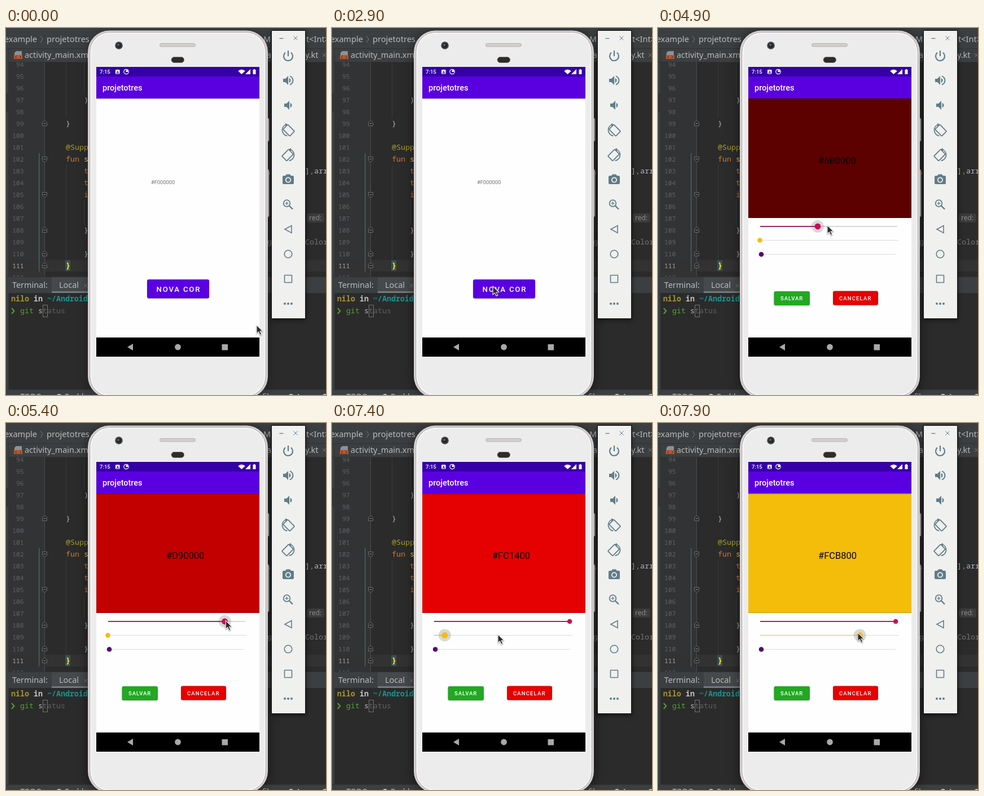
Write an HTML page with a canvas that moves like this. It is 567 by 651 pixels and loops after 8 s.

```html
<!DOCTYPE html>
<html lang="pt">
<head>
<meta charset="utf-8">
<title>projetotres</title>
<style>
html, body { margin: 0; width: 100%; height: 100%; overflow: hidden; background: #2b2b2b; }
canvas { display: block; }
</style>
</head>
<body>
<canvas id="stage" width="567" height="651"></canvas>
<script>
const c = document.getElementById('stage').getContext('2d');
const LOOP = 8000, TICK = 100;
const UI = '"Noto Sans", "Open Sans", sans-serif';
const MONO = '"Noto Sans Mono", "DejaVu Sans Mono", monospace';
const ROBOTO = 'Roboto, sans-serif';
const BAR = '#3c3f41', EDITOR = '#2b2b2b', PURPLE = '#5a00e0', ICON = '#5f7d88';

// Keyframes: time followed by values, linear in between.
const POINTER = [
  [100, 444, 527], [400, 403, 509], [600, 403, 509], [1000, 279, 457],
  [1200, 279, 457], [1700, 285, 458], [3100, 285, 458], [3400, 319, 469],
  [3600, 322, 470], [3700, 322, 470], [3800, 249, 439], [3900, 249, 439],
  [4000, 184, 360], [4100, 184, 360], [4200, 177, 339], [4400, 177, 339],
  [4500, 183, 352], [4700, 183, 352], [4900, 300, 350], [5000, 345, 357],
  [5200, 378, 352], [5300, 378, 352], [5700, 423, 346], [6200, 423, 346],
  [6300, 418, 352], [6500, 205, 372], [6600, 205, 372], [6800, 176, 372],
  [7100, 176, 372], [7200, 225, 381], [7300, 225, 381], [7400, 294, 375],
  [7600, 332, 375], [7700, 332, 375], [7900, 354, 372]
];
const RED = [[4700, 0], [4900, 107], [5200, 204], [5300, 204], [5700, 255], [6200, 255], [6300, 252]];
const GREEN = [[7300, 0], [7400, 20], [7600, 150], [7700, 150], [7900, 184]];

function at(keys, t) {
  if (t <= keys[0][0]) return keys[0].slice(1);
  for (let i = 1; i < keys.length; i++) {
    const a = keys[i - 1], b = keys[i];
    if (t <= b[0]) {
      const p = (t - a[0]) / (b[0] - a[0]);
      return a.slice(1).map((v, j) => v + (b[j + 1] - v) * p);
    }
  }
  return keys[keys.length - 1].slice(1);
}
const clamp = v => Math.max(0, Math.min(1, v));

function rect(x, y, w, h, fill) {
  c.fillStyle = fill;
  c.fillRect(x, y, w, h);
}
function round(x, y, w, h, r, fill, stroke, lw = 1) {
  c.beginPath();
  c.roundRect(x, y, w, h, r);
  if (fill) { c.fillStyle = fill; c.fill(); }
  if (stroke) { c.strokeStyle = stroke; c.lineWidth = lw; c.stroke(); }
}
function disc(x, y, r, fill) {
  c.beginPath();
  c.arc(x, y, r, 0, 7);
  c.fillStyle = fill;
  c.fill();
}
function arc(x, y, r, a, b, stroke, lw) {
  c.beginPath();
  c.arc(x, y, r, a, b);
  c.strokeStyle = stroke;
  c.lineWidth = lw;
  c.stroke();
}
function path(pts, fill, stroke, lw = 1, close = true) {
  c.beginPath();
  for (let i = 0; i < pts.length; i += 2) c.lineTo(pts[i], pts[i + 1]);
  if (close) c.closePath();
  if (fill) { c.fillStyle = fill; c.fill(); }
  if (stroke) { c.strokeStyle = stroke; c.lineWidth = lw; c.stroke(); }
}
const line = (x1, y1, x2, y2, color, lw = 1) => path([x1, y1, x2, y2], null, color, lw, false);
function text(s, x, y, font, color, gap = 0, align = 'left') {
  c.font = font;
  c.fillStyle = color;
  c.letterSpacing = gap + 'px';
  c.textAlign = align;
  c.fillText(s, x, y);
}
function shadow(color, blur, dy) {
  c.shadowColor = color;
  c.shadowBlur = blur;
  c.shadowOffsetY = dy;
}
const noShadow = () => shadow('transparent', 0, 0);
function cross(x, y, r, color) {
  line(x - r, y - r, x + r, y + r, color);
  line(x - r, y + r, x + r, y - r, color);
}

const rowY = n => 64.5 + (n - 94) * 21;
function code(n, x, s, color, bold) {
  text(s, x, rowY(n) + 4.5, (bold ? 'bold ' : '') + '13.3px ' + MONO, color);
}

function editor() {
  rect(0, 0, 567, 651, EDITOR);
  rect(5, 61, 63, 380, '#313335');
  rect(5, 411, 562, 21, '#323232');
  line(106.5, 61, 106.5, 160, '#393b3c');
  line(138.5, 61, 138.5, 118, '#393b3c');
  line(106.5, 243, 106.5, 411, '#393b3c');
  line(138.5, 306, 138.5, 349, '#393b3c');
  line(68.5, 61, 68.5, 441, '#4a4c4d');
  rect(58, 222, 1.3, 210, '#4d6b66');
  for (let n = 94; n <= 112; n++)
    text(n, 31.5, rowY(n) + 4, '11.3px ' + MONO, n == 111 ? '#a4a3a3' : '#606366', 0, 'right');
  for (const n of [99, 102, 105, 108, 110, 111]) {
    const y = rowY(n), d = n == 102 || n == 105 ? 1 : -1;
    path([64.5, y - 4 * d, 72.5, y - 4 * d, 72.5, y + 2 * d, 68.5, y + 5.5 * d, 64.5, y + 2 * d], EDITOR, '#6a6c6d');
    line(66.5, y, 70.5, y, '#8a8c8d');
  }
  rect(105, 412, 9, 19, '#3b514d');
  code(97, 138, ')', '#a9b7c6');
  code(99, 106, '}', '#a9b7c6');
  code(101, 106, '@Suppress', '#a9a028');
  code(102, 106, 'fun', '#cc7832');
  code(102, 138, 's', '#ffc66d');
  code(103, 138, 't', '#cc7832');
  code(104, 138, 't', '#cc7832');
  code(105, 138, 'if', '#cc7832');
  code(108, 138, '}', '#a9b7c6');
  code(110, 138, '}', '#a9b7c6');
  code(111, 106, '}', '#ffef28', true);
  code(103, 463, ',', '#cc7832');
  code(103, 530, ']', '#a9b7c6');
  code(103, 538, ',', '#cc7832');
  code(103, 546, 'arr', '#a9b7c6');
  round(533, 329, 31, 16, 4, '#3b3b3b');
  text('red:', 537, 341, '12px ' + UI, '#8a8a8a');
  code(109, 463, 'gr', '#777');
  code(109, 530, 'Color', '#777');

  // Breadcrumbs and tabs
  rect(0, 0, 567, 61, BAR);
  rect(0, 36, 567, 1, '#2f3133');
  rect(0, 60, 567, 1, '#323232');
  rect(0, 61, 5, 590, BAR);
  rect(4, 37, 1, 604, '#323435');
  rect(0, 115, 4, 34, '#313335');
  text('example', 55, 25, '14.5px ' + UI, '#bbb', 0, 'right');
  text('projetotres', 72, 25, '14.6px ' + UI, '#bbb');
  path([61, 14, 65, 20, 61, 26], null, '#777', 1, false);
  text('M', 456, 25, '14.5px ' + UI, '#bbb');
  text('t<Int>', 532, 25, '14.5px ' + UI, '#bbb');
  path([18, 41, 28, 41, 28, 55, 15, 55, 15, 44], '#8a9298');
  rect(14, 48, 15, 7, '#b8582f');
  path([19, 49, 16.5, 51.5, 19, 54], null, '#3a2a22', 1, false);
  path([24, 49, 26.5, 51.5, 24, 54], null, '#3a2a22', 1, false);
  text('activity_main.xml', 33, 53, '14.4px ' + UI, '#bbb');
  text('a', 462, 53, '14.4px ' + UI, '#bbb');
  text('y.kt', 530, 53, '14.4px ' + UI, '#bbb');
  cross(564, 48, 3, '#777');

  // Terminal
  rect(0, 441, 567, 29, BAR);
  rect(0, 441, 567, 1, '#323232');
  text('Terminal:', 11, 461, '14.4px ' + UI, '#bbb');
  rect(81, 442, 70, 28, '#45494b');
  text('Local', 94, 461, '14.4px ' + UI, '#bbb');
  cross(141, 457, 3, '#777');
  rect(81, 467, 70, 3, '#747a80');
  const term = '13.3px ' + MONO;
  text('nilo', 9, 485, 'bold ' + term, '#a3942f');
  text('in', 49, 485, 'bold ' + term, '#c4c4c4');
  text('~/Android', 73, 485, 'bold ' + term, '#1a9490');
  path([10, 497, 14.5, 502, 10, 507], null, '#4fa52c', 2, false);
  text('git', 25, 506, term, '#4fa52c');
  text('s', 57, 506, term, '#bbb');
  text('tatus', 65, 506, term, '#606060');
  round(65.5, 491.5, 8, 21, 0, null, '#777');
  rect(0, 641, 567, 10, BAR);
  rect(0, 641, 567, 1, '#323232');
  text('≡ TODO', 14, 659, '13.5px ' + UI, '#bbb');
  disc(94, 654, 5, '#bbb');
  text('Problems', 104, 659, '13.5px ' + UI, '#bbb');
  text('filer', 454, 659, '13.5px ' + UI, '#bbb');
  disc(505, 654, 5, '#bbb');
  text('App', 514, 659, '13.5px ' + UI, '#bbb');
  disc(565, 654, 5, '#bbb');
}

function phone(focus) {
  round(461, 160, 5, 41, 2, '#d8d6d6', '#8d8a8a');
  round(461, 251, 5, 84, 2, '#d8d6d6', '#8d8a8a');
  shadow(`rgba(0,0,0,${0.3 + 0.2 * focus})`, 20, 2);
  round(145, 4.5, 319, 651.5, 38, '#d6d1d0');
  noShadow();
  round(148.8, 7.5, 311.4, 645.5, 35, '#ebeceb', '#a7a1a0');
  round(150.5, 9, 308, 642.5, 33.5, null, '#f6f6f6', 2);
  disc(200, 31, 6.8, '#454648');
  disc(200, 31, 4.6, '#242628');
  disc(199, 30, 1.8, '#67717a');
  round(272.5, 27.5, 63, 5.5, 2.7, '#d3cfcf', '#b7b1b1');
  round(293, 51.5, 22.5, 10, 5, '#2e2b2b', '#77716f', 0.8);
}

function appBar() {
  rect(160, 69, 289, 480, '#fdfefd');
  shadow('rgba(0,0,0,.3)', 2, 0.5);
  rect(160, 86, 289, 39, PURPLE);
  noShadow();
  rect(160, 69, 289, 17, '#3500a6');
  text('projetotres', 171, 111, '500 14.5px ' + ROBOTO, '#fff');
}

function statusIcons() {
  text('7:15', 166, 81, '500 9.5px ' + ROBOTO, '#fff');
  round(194, 74, 7.5, 7.5, 1, '#fff');
  text('A', 197.8, 80.5, 'bold 7px ' + ROBOTO, '#3500a6', 0, 'center');
  arc(213, 77.5, 4.2, 0, 7, '#fff', 1.2);
  rect(212.5, 74.5, 3.5, 3.5, '#fff');
  c.beginPath();
  c.moveTo(417.5, 82);
  c.arc(417.5, 82, 8.2, -Math.PI * 0.77, -Math.PI * 0.23);
  c.fillStyle = '#fff';
  c.fill();
  path([424, 82, 433, 82, 433, 73], '#fff');
  rect(437.5, 74, 5, 8, '#fff');
  rect(439, 73, 2, 1, '#fff');
}

function button(x, y, w, h, fill, lift = 0) {
  shadow('rgba(0,0,0,.3)', 1.5 + lift, 0.6 + lift);
  round(x, y, w, h, 3, fill);
  noShadow();
}

function homeScreen(pressed) {
  appBar();
  text('#F000000', 257, 277, '9.3px ' + ROBOTO, '#747474');
  button(250, 446, 110, 33.5, PURPLE, pressed ? 0.6 : 0);
  text('NOVA COR', 266.5, 468, '500 13.2px ' + ROBOTO, '#fff', 1.8);
}

function slider(x, end, y, lw, value, tint, thumb, pressed, halo) {
  const px = x + (end - x) * value / 255;
  line(x, y, end, y, '#dadada', lw);
  line(x, y, px, y, tint, lw);
  if (halo) disc(px, y, 11, 'rgba(70,70,70,.2)');
  disc(px, y, pressed ? 5.4 : 4.3, thumb);
}

const hex = v => Math.round(v).toString(16).toUpperCase().padStart(2, '0');

function pickerScreen(t) {
  const [r] = at(RED, t), [g] = at(GREEN, t);
  appBar();
  if (t >= 4800) {
    const shown = [230 * (r / 255) ** 1.05 + 16 * g / 184, 189 * clamp((g - 20) / 164), 10 * g / 184];
    rect(160, 125, 289, 212, `rgb(${shown.map(Math.round).join()})`);
    rect(160, 125, 289, 1.5, 'rgba(0,0,0,.22)');
    rect(160, 336, 289, 1, 'rgba(0,0,0,.2)');
    text('#' + hex(r) + hex(g) + '00', 284, 241, '16.5px ' + ROBOTO, '#0a0000');
  }
  const dragRed = t >= 4800 && t < 6400;
  slider(181, 424, 352, 2, r, '#a0246c', '#cc0c5c', dragRed, dragRed);
  slider(180.5, 426, 376.5, 1.2, g, '#dcc440', '#f3bd10', t >= 7200, t >= 7300);
  slider(183, 421, 401.5, 1.2, 0, '#5a0072', '#5a0072');
  button(205.5, 467, 63.5, 25, '#22a822');
  text('SALVAR', 217, 483, '500 9.5px ' + ROBOTO, '#fff', 1);
  button(310, 466.5, 80, 25, '#e60000');
  text('CANCELAR', 321, 482.5, '500 9.5px ' + ROBOTO, '#fff', 1.15);
}

// Draws a view scaled about the middle of the display.
function zoomed(scale, alpha, view) {
  c.save();
  c.globalAlpha = alpha;
  c.translate(304.5, 326);
  c.scale(scale, scale);
  c.translate(-304.5, -326);
  view();
  c.restore();
}

function screen(t) {
  c.save();
  c.beginPath();
  c.rect(160, 69, 289, 514);
  c.clip();
  const shown = 1 - (1 - clamp((t - 3100) / 500)) ** 4;
  if (shown < 1) zoomed(1 + 0.05 * shown, 1, () => homeScreen(t >= 2900));
  if (shown > 0) zoomed(0.85 + 0.15 * shown, clamp(shown * 1.5), () => pickerScreen(t));
  statusIcons();
  rect(160, 549, 289, 34, '#000');
  path([215, 566, 225, 560, 225, 572], '#a9a9a9');
  disc(304.5, 566, 5.4, '#a9a9a9');
  rect(382.5, 561, 10.5, 10.5, '#a9a9a9');
  c.restore();
}

function speaker(x, y, waves) {
  path([x, y - 3, x + 4, y - 3, x + 9, y - 8, x + 9, y + 8, x + 4, y + 3, x, y + 3], ICON);
  c.beginPath();
  c.arc(x + 9, y, 4.5, -1.2, 1.2);
  c.fillStyle = ICON;
  c.fill();
  if (waves) arc(x + 9.5, y, 8, -1.25, 1.25, ICON, 2);
}
function rotateIcon(y, dir) {
  c.save();
  c.translate(500, y);
  c.scale(dir, 1);
  c.save();
  c.translate(1, 0.5);
  c.rotate(Math.PI / 4);
  round(-8.5, -6, 17, 12, 1, null, ICON, 1.8);
  c.restore();
  arc(0, 0, 10.5, Math.PI * 0.55, Math.PI * 1.35, ICON, 1.6);
  path([-5, -12, 0, -9.5, -5, -6.5], ICON);
  c.restore();
}

function toolbar() {
  shadow('rgba(0,0,0,.6)', 8, 2);
  rect(470, 4, 61, 512, '#111');
  noShadow();
  rect(471, 5, 59, 510, '#f0f0ef');
  line(484.5, 18.5, 491.5, 18.5, ICON, 1.3);
  cross(513, 18, 3.5, ICON);
  arc(500, 50, 8, -0.9, Math.PI + 0.9, ICON, 2.2);
  line(500, 40, 500, 50, ICON, 2.2);
  speaker(491, 93, true);
  speaker(493, 137, false);
  rotateIcon(181, 1);
  rotateIcon(225, -1);
  round(490, 262, 20, 15, 2, ICON);
  path([495, 262, 497, 259.5, 503, 259.5, 505, 262], ICON);
  disc(500, 269.5, 5, '#f0f0ef');
  disc(500, 269.5, 3.2, ICON);
  arc(497.5, 311, 5.8, 0, 7, ICON, 1.8);
  line(502, 315.5, 508, 321.5, ICON, 2.4);
  line(494.5, 311, 500.5, 311, ICON, 1.3);
  line(497.5, 308, 497.5, 314, ICON, 1.3);
  path([494, 357, 506, 350.5, 506, 363.5], null, ICON, 1.6);
  arc(500, 401, 6.8, 0, 7, ICON, 1.6);
  round(493.5, 438.5, 13, 13, 0.5, null, ICON, 1.6);
  for (const x of [494, 500, 506]) disc(x, 489, 2, ICON);
}

function pointer([x, y]) {
  shadow('rgba(0,0,0,.35)', 2, 1);
  path([x, y, x, y + 15, x + 3.5, y + 11.8, x + 6, y + 17.5, x + 8.7, y + 16.3, x + 6.2, y + 10.8, x + 10.8, y + 10.6],
    '#2c2c2c', '#f4f4f4', 1.1);
  noShadow();
}

function draw(now) {
  const t = Math.floor(now % LOOP / TICK) * TICK;
  c.clearRect(0, 0, 567, 651);
  editor();
  phone(clamp((t - 1200) / 500));
  screen(t);
  toolbar();
  pointer(at(POINTER, t));
}

const start = performance.now();
function frame() {
  draw(performance.now() - start);
  requestAnimationFrame(frame);
}
frame();
</script>
</body>
</html>
```
